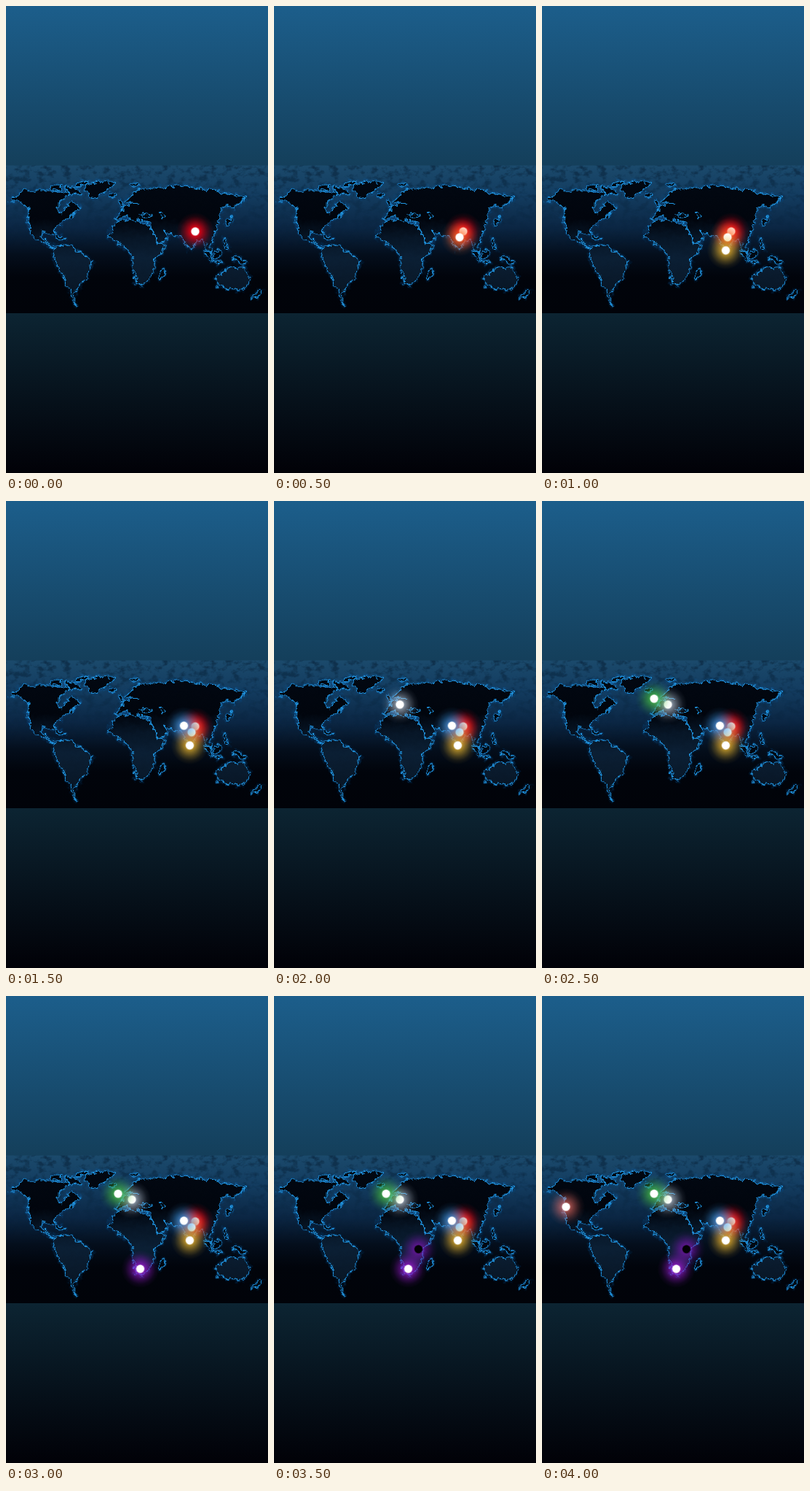
An HTML page that plays this animation: 360x640 px, repeating every 4500 ms.

```html
<!DOCTYPE html>
<html lang="en">
<head>
<meta charset="utf-8">
<title>World map</title>
<style>
  html, body { margin: 0; width: 100%; height: 100%; overflow: hidden; background: #02030a; }
  svg { display: block; width: 100%; height: 100%; }
</style>
</head>
<body>
<svg viewBox="0 0 360 640" preserveAspectRatio="none">
  <defs>
    <linearGradient id="backdrop" x2="0" y2="1">
      <stop offset="0" stop-color="#1c5e8b"/>
      <stop offset=".34" stop-color="#143f5b"/>
      <stop offset=".66" stop-color="#0c2432"/>
      <stop offset="1" stop-color="#010107"/>
    </linearGradient>
    <linearGradient id="sea" x2="0" y2="1">
      <stop offset="0" stop-color="#1b4a6c"/>
      <stop offset=".2" stop-color="#133c60"/>
      <stop offset=".42" stop-color="#0b2643"/>
      <stop offset=".6" stop-color="#040e1c"/>
      <stop offset=".75" stop-color="#01040b"/>
      <stop offset="1" stop-color="#010309"/>
    </linearGradient>
    <linearGradient id="land" gradientUnits="userSpaceOnUse" x1="0" x2="0" y1="240" y2="411">
      <stop offset="0" stop-color="#020812"/>
      <stop offset=".3" stop-color="#01050d"/>
      <stop offset=".46" stop-color="#071627"/>
      <stop offset=".62" stop-color="#0b1f34"/>
      <stop offset="1" stop-color="#07121f"/>
    </linearGradient>
    <linearGradient id="fade" x2="0" y2="1">
      <stop offset="0" stop-color="#fff"/>
      <stop offset=".18" stop-color="#aaa"/>
      <stop offset=".55" stop-color="#000"/>
    </linearGradient>
    <mask id="upper"><rect y="218" width="360" height="203" fill="url(#fade)"/></mask>
    <filter id="grunge" x="0" y="0" width="1" height="1" color-interpolation-filters="sRGB">
      <feTurbulence type="fractalNoise" baseFrequency=".09 .12" numOctaves="5" seed="8"/>
      <feColorMatrix values="0 0 0 0 .03  0 0 0 0 .13  0 0 0 0 .22  4 0 0 0 -1.9"/>
    </filter>
    <!-- Noise roughens the plain outlines into coasts -->
    <filter id="coast" filterUnits="userSpaceOnUse" x="0" y="218" width="360" height="203"
            color-interpolation-filters="sRGB">
      <feTurbulence type="fractalNoise" baseFrequency=".14" numOctaves="3" seed="5" result="noise"/>
      <feDisplacementMap in="SourceGraphic" in2="noise" scale="10"
                         xChannelSelector="R" yChannelSelector="G"/>
    </filter>
    <filter id="soft" filterUnits="userSpaceOnUse" x="0" y="218" width="360" height="203">
      <feGaussianBlur stdDeviation="1.7"/>
    </filter>
    <clipPath id="frame"><rect y="218.5" width="360" height="202.5"/></clipPath>
  </defs>
  <rect width="360" height="640" fill="url(#backdrop)"/>
  <g clip-path="url(#frame)">
    <rect y="218" width="360" height="204" fill="url(#sea)"/>
    <g mask="url(#upper)"><rect y="218" width="360" height="204" filter="url(#grunge)" opacity=".6"/></g>
    <g filter="url(#coast)" stroke-linejoin="round">
      <g id="halo" fill="none" stroke="#0b65b5" stroke-width="3" opacity=".5" filter="url(#soft)"/>
      <g id="lands" fill="url(#land)" stroke="#2096e2" stroke-width="1.15"/>
    </g>
  </g>
  <g id="markers"></g>
</svg>
<script>
const continents = {
  northAmerica: `5,268 22,253 64,253 88,256 68,276 76,286 90,264 102,278 66,305 67,313
    50,308 49,318 66,331 38,318 29,295 31,277 19,268`,
  greenland: '107,246 130,240 151,242 134,256 119,264',
  southAmerica: '68,329 88,328 106,341 119,349 110,373 94,392 95,410 80,373 65,346',
  africa: `140,315 153,295 173,292 198,302 208,326 220,327 204,350 204,364 187,384
    179,381 172,338`,
  eurasia: `150,293 158,281 170,270 184,271 164,267 180,252 243,246 329,262 314,277
    306,273 296,276 291,299 283,322 280,340 270,319 262,322 253,335 243,317 217,309
    223,319 209,326 198,298 183,292 178,297 167,288`,
  australia: '289,370 310,357 319,363 325,355 335,373 326,390 290,384'
};

// Each island or inland sea: x, y, half length, half width, angle
const islands = [
  [69, 249, 7, 3, 0],
  [92, 253, 13, 4, 20],
  [104, 244, 9, 3, -15],
  [146, 259, 5, 2, 0],
  [159, 271, 6, 2.5, 75],
  [177, 245, 5, 2, 0],
  [74, 317, 8, 1.5, 15],
  [214, 367, 8, 3, 115],
  [307, 295, 8, 2, -50],
  [302, 327, 8, 2, 70],
  [279, 342, 9, 2.5, 48],
  [291, 351, 6, 1.5, 8],
  [291, 340, 6, 4, -45],
  [321, 348, 10, 3, 25],
  [345, 395, 9, 2, -38],
  [193, 287, 7, 2.5, 5],
  [215, 287, 5, 2.5, 75]
];

// Each marker: x, y, glow colour, glow strength, core colour
const markers = [
  [260, 309, '#f50014', 1],
  [255, 317, '#ff6b2a', .8],
  [252.5, 335, '#e8b42c', .85],
  [244.5, 308, '#3a9cf0', .8],
  [173, 279, '#c4d4e6', .75],
  [154, 271, '#46c03c', .8],
  [184.5, 374, '#9a18d0', .9],
  [198.5, 347, '#8c14c4', .72, '#020106'],
  [33, 289, '#f07068', .75]
];

const STEP = 500;
const byId = id => document.getElementById(id);

function add(parent, tag, attributes) {
  const node = document.createElementNS('http://www.w3.org/2000/svg', tag);
  for (const [name, value] of Object.entries(attributes)) node.setAttribute(name, value);
  return parent.appendChild(node);
}

for (const layer of [byId('halo'), byId('lands')]) {
  for (const points of Object.values(continents)) add(layer, 'polygon', { points });
  for (const [x, y, rx, ry, angle] of islands)
    add(layer, 'ellipse', { rx, ry, transform: `translate(${x} ${y}) rotate(${angle})` });
}

const dots = markers.map(([x, y, color, strength, core = '#fff'], i) => {
  const group = add(byId('markers'), 'g', { transform: `translate(${x} ${y})` });
  const glow = add(group, 'radialGradient', { id: 'glow' + i });
  for (const [offset, alpha] of [[0, 1], [.2, .9], [.38, .62], [.6, .32], [.8, .1], [1, 0]])
    add(glow, 'stop', { offset, 'stop-color': color, 'stop-opacity': alpha * strength });
  add(group, 'circle', { r: 26, fill: `url(#glow${i})` });
  add(group, 'circle', { r: 6.3, fill: core, opacity: .3 });
  add(group, 'circle', { r: 5.4, fill: core });
  return group;
});

function draw() {
  const latest = Math.floor(performance.now() / STEP) % dots.length;
  dots.forEach((dot, i) => dot.setAttribute('visibility', i <= latest ? 'visible' : 'hidden'));
  requestAnimationFrame(draw);
}
draw();
</script>
</body>
</html>
```
